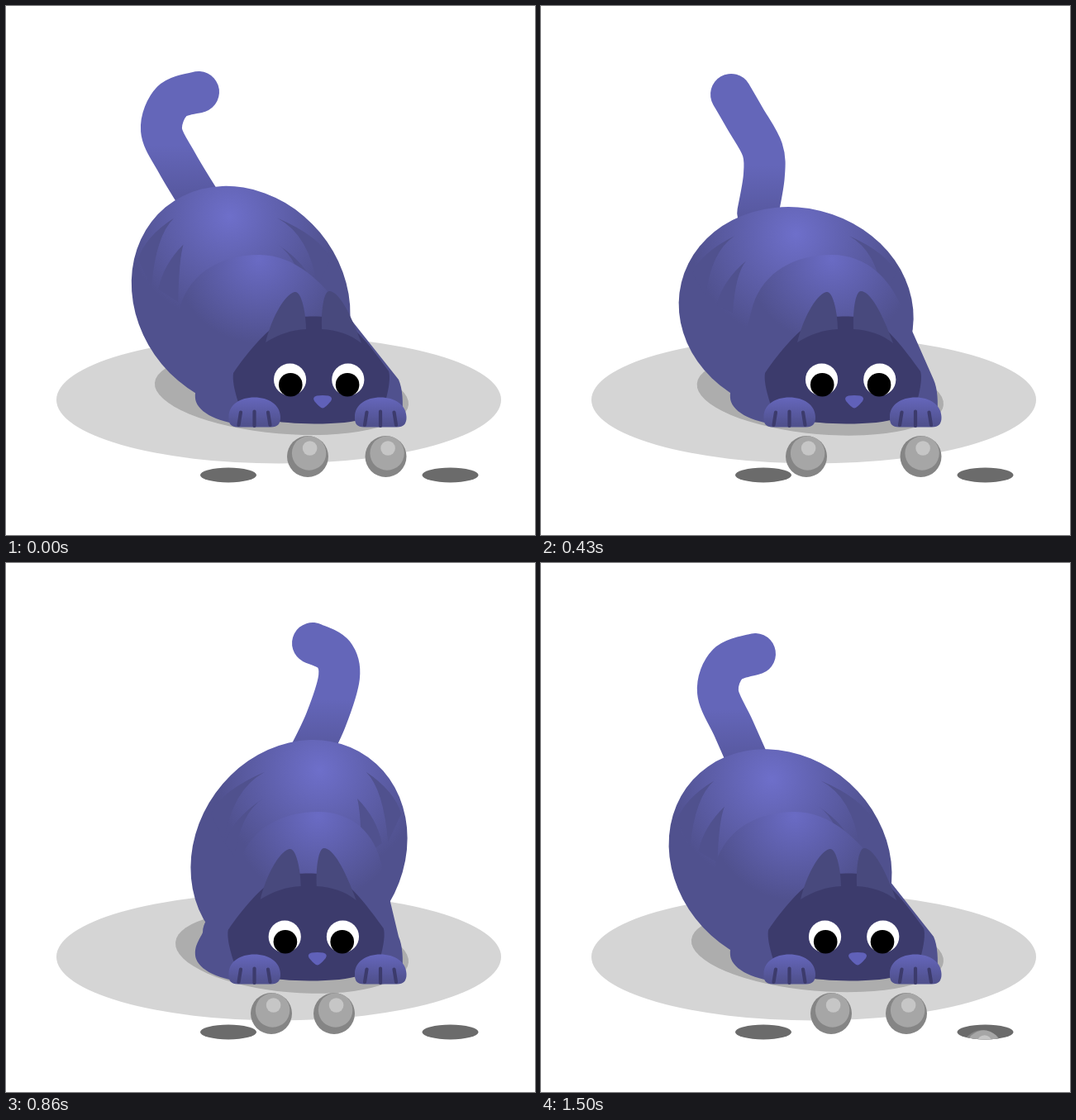
Animation, 640 px wide and 640 px high, one loop 1.57 s. Source, as an HTML page with a canvas:

```html
<!DOCTYPE html>
<html lang="en">
<head>
<meta charset="utf-8">
<title>Cat watching marbles</title>
<style>
  html, body { margin: 0; width: 100%; height: 100%; overflow: hidden; background: #fff; }
  canvas { display: block; width: 640px; height: 640px; }
</style>
</head>
<body>
<canvas id="stage" width="640" height="640"></canvas>
<script>
const g = document.getElementById('stage').getContext('2d');
const LOOP = 1570, STEPS = 22, HALF = STEPS / 2, TAU = Math.PI * 2;
const FUR = '#50518e', DARK = '#3c3b6c', EAR = '#48497d';

// Tail poses over half a loop: [step, x0,y0 ... x4,y4] from base to tip.
// The other half is the mirror image.
const TAIL_AXIS = 295;
const TAIL = [
  [0, 236,238, 207,190, 188,150, 201,115, 233,104],
  [1, 226,238, 203,190, 187,138, 194,110, 219,97],
  [2.5, 228,240, 213,191, 195,143, 186,110, 199,89],
  [4, 236,245, 232,196, 213,153, 192,118, 192,95],
  [5, 244,245, 249,200, 237,167, 211,131, 206,101],
  [7, 283,255, 291,213, 299,177, 284,137, 255,113],
  [8, 306,255, 311,215, 324,170, 313,129, 275,120],
  [10, 338,243, 357,200, 376,156, 364,122, 331,110]
];

// Marble path, one entry per step, starting at step 6 of its life.
const FIRST = 6;
const ROLL_X = [270, 280, 290.5, 299.5, 308, 315, 321, 333, 344, 351, 365, 381, 397,
  414, 430.5, 442, 459.5, 477, 494.5, 515, 533.5, 534, 534];
const RISE = [603, 568, 546], SINK = [555, 576, 590, 620];
const HOLES = [269, 537.5], HOLE_Y = 567.5;

const wave = (k, shift) => Math.cos(TAU * (k - shift) / STEPS);

function oval(x, y, rx, ry, color, turn = 0) {
  g.beginPath();
  g.ellipse(x, y, rx, ry, turn, 0, TAU);
  g.fillStyle = color;
  g.fill();
}

function shape(d, color) {
  g.fillStyle = color;
  g.fill(new Path2D(d));
}

function glow(x, y, r, inner) {
  const c = g.createRadialGradient(x, y, 0, x, y, r);
  c.addColorStop(0, inner);
  c.addColorStop(1, FUR);
  return c;
}

function fade(y0, y1, top, bottom) {
  const c = g.createLinearGradient(0, y0, 0, y1);
  c.addColorStop(0, top);
  c.addColorStop(1, bottom);
  return c;
}

function tailPose(i) {
  const n = TAIL.length, turn = Math.floor(i / n);
  const [u, ...p] = TAIL[i - turn * n];
  const flip = turn % 2 !== 0;
  return { u: u + turn * HALF, p: p.map((v, j) => flip && j % 2 === 0 ? 2 * TAIL_AXIS - v : v) };
}

function tailAt(k) {
  let i = 0;
  while (tailPose(i + 1).u <= k) i++;
  const [a, b, c, d] = [-1, 0, 1, 2].map(j => tailPose(i + j));
  const h = c.u - b.u, s = (k - b.u) / h, s2 = s * s, s3 = s2 * s;
  const v = b.p.map((from, j) => {
    const m0 = (c.p[j] - a.p[j]) / (c.u - a.u) * h;
    const m1 = (d.p[j] - from) / (d.u - b.u) * h;
    return (2 * s3 - 3 * s2 + 1) * from + (s3 - 2 * s2 + s) * m0
      + (3 * s2 - 2 * s3) * c.p[j] + (s3 - s2) * m1;
  });
  return [0, 2, 4, 6, 8].map(j => [v[j], v[j + 1]]);
}

function drawTail(k, top) {
  const p = tailAt(k), at = i => p[Math.max(0, Math.min(p.length - 1, i))];
  g.beginPath();
  g.moveTo(...p[0]);
  for (let i = 0; i < p.length - 1; i++) {
    const [a, b, c, d] = [at(i - 1), at(i), at(i + 1), at(i + 2)];
    g.bezierCurveTo(b[0] + (c[0] - a[0]) / 6, b[1] + (c[1] - a[1]) / 6,
      c[0] - (d[0] - b[0]) / 6, c[1] - (d[1] - b[1]) / 6, ...c);
  }
  g.strokeStyle = fade(top - 50, top + 12, '#6466b9', '#57589f');
  g.lineWidth = 50;
  g.lineCap = g.lineJoin = 'round';
  g.stroke();
}

// A wedge from tip (x, y) to two end offsets.
function stripe(x, y, ox, oy, ix, iy) {
  g.beginPath();
  g.moveTo(x, y);
  g.quadraticCurveTo(x + ox * .8, y + oy * .45, x + ox, y + oy);
  g.lineTo(x + ix, y + iy);
  g.quadraticCurveTo(x + ix * .8, y + iy * .25, x, y);
  g.fillStyle = FUR;
  g.fill();
}

function drawRear(a) {
  const lift = a * a, mid = 318 + 54 * a, tipY = 280 - 25 * lift;
  g.save();
  g.beginPath();
  g.ellipse(318 + 35 * a, 370 - 17.5 * lift, 143, 124.5, -a * 52 * Math.PI / 180, 0, TAU);
  g.clip();
  g.fillStyle = glow(mid + 5, tipY - 2, 128, '#6e6fca');
  g.fillRect(0, 0, 640, 640);
  for (const s of [-1, 1]) {
    const m = -s * a;
    stripe(mid + s * (70 - 8 * lift), tipY,
      s * (54 + 11 * m), 45 + 5 * lift, s * (38 + 11 * m), 72 + 12 * lift);
    stripe(mid + s * (57 + 6 * m), tipY + 30 + 2 * lift,
      s * (38 + 8 * m), 54, s * (20 + 14 * m), 62 + 8 * lift);
  }
  g.restore();
}

function drawChest(x) {
  const rx = 428 + .7 * (x - 341), dx = 475 - rx, len = Math.hypot(dx, 90);
  const cx = rx - dx / len * 32, cy = 362 - 90 / len * 32;
  shape(`M238 447C234 456 226 465 230 479C236 495 265 507 300 507L330 500H440L479 500
    Q482 468 475 452L${rx} 362C${cx} ${cy} ${x + 45} 301 ${x} 301
    C${x - 45} 301 ${x - 82} 322 ${x - 95} 362C${x - 105} 400 238 425 238 447Z`,
    glow(x, 306, 102, '#6a6bc4'));
}

function drawHead(dx) {
  g.save();
  g.translate(dx, 0);
  shape(`M275 444C283 432 300 409 318 393C335 378 350 375.5 372 375.5
    C396 375.5 412 381 426 396C440 410 455 431 463 442Q466 452 459 478
    C452 497 430 505.5 373 505.5C330 505 287 500 281 480Q273 455 275 444Z`, DARK);
  shape('M314 407C320 382 335 350 349 346C358 344 363 375 363 391C345 392 330 397 314 407Z', EAR);
  shape('M382 391C381 370 384 345 391 345C402 345 416 370 430 408C416 397 400 392 382 391Z', EAR);
  for (const [x, look] of [[343.5, .7], [413.7, -.7]]) {
    oval(x, 452, 19.6, 19.6, '#fff');
    oval(x + look, 458.2, 14.3, 14.3, '#000');
  }
  shape('M376 471.5Q383 470.5 390 471.5Q396 473 393 478Q386 486.5 383 486.5Q380 486.5 373 478Q370 473 376 471.5Z', '#6061b9');
  g.restore();
}

function drawPaw(x) {
  g.save();
  g.translate(x, 0);
  shape('M-31 497C-31 482 -17 473.5 0 473.5C17 473.5 31 482 31.5 497Q32 509.5 20 509.5H-20Q-32 509.5 -31 497Z',
    fade(474, 506, '#6566bb', FUR));
  g.strokeStyle = DARK;
  g.lineWidth = 4.2;
  g.lineCap = 'round';
  g.stroke(new Path2D('M-16.5 491.5L-19 507M0 490.5V508M16.5 491.5L19 507'));
  g.restore();
}

function drawMarble(age) {
  const i = age - FIRST, last = ROLL_X.length - SINK.length;
  if (i < 0 || i >= ROLL_X.length) return;
  const x = ROLL_X[i], y = i < RISE.length ? RISE[i] : i >= last ? SINK[i - last] : 545;
  oval(x, y, 25, 25, '#858585');
  oval(x + 1.6, y - 4, 20.7, 20.7, '#a6a6a6');
  oval(x + 2.6, y - 10, 8.8, 8.8, '#c6c6c6');
}

function drawMarbles(k) {
  g.save();
  g.beginPath();
  g.rect(0, 0, 640, HOLE_Y);
  // Outside the holes nothing hides the marbles' lower edge.
  g.rect(303, HOLE_Y, 200, 40);
  for (const x of HOLES) {
    g.moveTo(x + 34, HOLE_Y);
    g.ellipse(x, HOLE_Y, 34, 9, 0, 0, Math.PI);
  }
  g.clip();
  for (const offset of [0, 6, 16]) {
    const age = (k + offset) % STEPS;
    drawMarble(age < FIRST ? age + STEPS : age);
    if (age === FIRST) drawMarble(age + STEPS);
  }
  g.restore();
}

function draw(k) {
  const lean = -1.05 * wave(k, 1.4);
  const left = 192 + 12.5 * lean;
  g.fillStyle = '#fff';
  g.fillRect(0, 0, 640, 640);
  oval(330, 476.5, 269, 77, '#d5d5d5');
  oval((left + 487) / 2, 470 + lean, (487 - left) / 2 + .5, 48.4, '#adadad', .087);
  for (const x of HOLES) oval(x, HOLE_Y, 34, 9, '#6b6b6b');
  drawTail(k, 245 - 28 * lean * lean);
  drawRear(lean);
  drawChest(343 - 37 * wave(k, -.3));
  drawHead(3.3 * wave(k, -.3) - 3.2);
  drawPaw(300.5);
  drawPaw(453);
  drawMarbles(k);
}

const start = performance.now();
let shown = -1;
function tick() {
  const t = (performance.now() - start) % LOOP;
  const k = Math.floor((t + 5) * STEPS / LOOP) % STEPS;
  if (k !== shown) draw(shown = k);
  requestAnimationFrame(tick);
}
tick();
</script>
</body>
</html>
```
